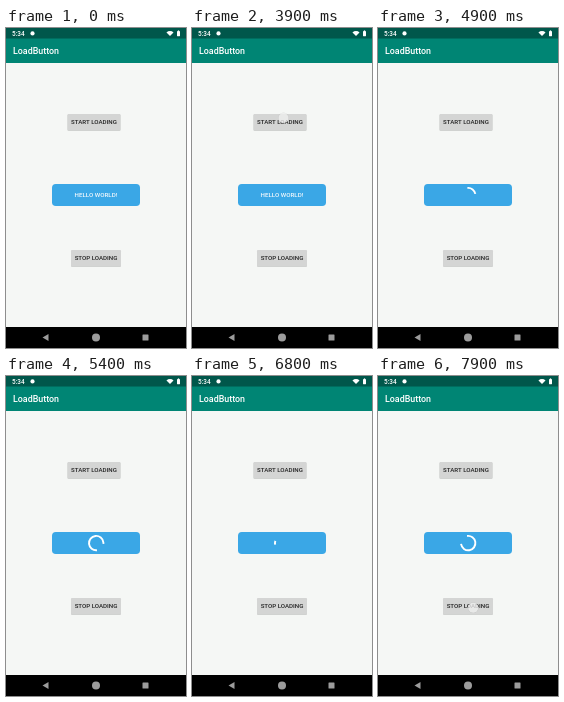
Animation, 180 px wide and 320 px high, one loop 8 s. Source, as an HTML page with a canvas:

```html
<!DOCTYPE html>
<html lang="en">
<head>
<meta charset="utf-8">
<title>Load button</title>
<style>
html, body { margin: 0; width: 100%; height: 100%; overflow: hidden; background: #f5f7f5; }
canvas { display: block; width: 180px; height: 320px; }
</style>
</head>
<body>
<canvas id="stage"></canvas>
<script>
const W = 180, H = 320, LOOP = 8000, STEP = 100;
const SPIN_START = 4000, SWEEP_START = 3800, SWEEP_TIME = 1000;
const MIN_ARC = 30, MAX_SWEEP = 300;
const canvas = document.getElementById('stage');
const ctx = canvas.getContext('2d');
const ratio = window.devicePixelRatio || 1;
canvas.width = W * ratio;
canvas.height = H * ratio;
ctx.scale(ratio, ratio);

function rect(x, y, w, h, color, r = 0) {
  ctx.fillStyle = color;
  ctx.beginPath();
  ctx.roundRect(x, y, w, h, r);
  ctx.fill();
}

function disc(x, y, r, color) {
  ctx.fillStyle = color;
  ctx.beginPath();
  ctx.arc(x, y, r, 0, Math.PI * 2);
  ctx.fill();
}

function poly(points, color) {
  ctx.fillStyle = color;
  ctx.beginPath();
  points.forEach(([x, y]) => ctx.lineTo(x, y));
  ctx.fill();
}

function label(text, x, y, size, color, align = 'center') {
  ctx.font = `500 ${size}px Roboto, sans-serif`;
  ctx.textAlign = align;
  ctx.fillStyle = color;
  ctx.fillText(text, x, y);
}

function topBars() {
  rect(0, 0, W, 35, '#008574');
  rect(0, 0, W, 10.5, '#00574b');
  label('5:34', 6, 7.8, 6.4, '#fff', 'left');
  disc(26.5, 5.4, 2.1, '#fff');
  ctx.fillStyle = '#fff';
  ctx.beginPath();
  ctx.moveTo(164, 8);
  ctx.arc(164, 8, 5, -Math.PI * 0.75, -Math.PI * 0.25);
  ctx.fill();
  rect(171, 3, 3, 5.2, '#fff', 0.4);
  rect(171.9, 2.4, 1.2, 1, '#fff');
  label('LoadButton', 7, 26.2, 8.9, '#fff', 'left');
}

function navBar() {
  const gray = '#9c9c9c';
  rect(0, 299, W, 21, '#000');
  poly([[36.5, 309.5], [42.5, 306], [42.5, 313]], gray);
  disc(90, 309.5, 4, gray);
  rect(136.5, 306.5, 6, 6, gray, 0.5);
}

function grayButton(text, x, y, w, color = '#d4d5d4') {
  rect(x, y + 0.5, w, 16.5, 'rgba(0,0,0,.16)', 1);
  rect(x, y, w, 16.4, color, 1);
  label(text, x + w / 2, y + 10.4, 6.15, '#222');
}

// The arc turns once a second while it shrinks and grows in turn.
function spinner(t) {
  const phase = (t - SWEEP_START) / SWEEP_TIME;
  const round = Math.floor(phase);
  const growing = round % 2 === 1;
  const left = 1 - phase % 1;
  const sweep = MAX_SWEEP * (1 - left * left);
  const offset = Math.ceil(round / 2) * 2 * MIN_ARC;
  const base = (t - SPIN_START) * 0.36 - offset;
  const from = growing ? base : base + sweep;
  const to = base + MIN_ARC + (growing ? sweep : MAX_SWEEP);
  const rad = Math.PI / 180;
  ctx.strokeStyle = '#fff';
  ctx.lineWidth = 1.9;
  ctx.beginPath();
  ctx.arc(90.2, 167.1, 7.2, from * rad, to * rad);
  ctx.stroke();
}

function touch(x, y) {
  disc(x, y, 5.4, 'rgba(150,150,150,.2)');
  disc(x, y, 5, 'rgba(245,245,245,.72)');
}

function draw(t) {
  const pressed = t >= 4000 && t < 4200;
  rect(0, 0, W, H, '#f5f7f5');
  topBars();
  grayButton('START LOADING', 61.5, 86, 53, pressed ? '#cbcccb' : undefined);
  grayButton('STOP LOADING', 65, 222, 50);
  rect(46, 156, 88, 22, '#3aa7e6', 3.8);
  if (t <= SPIN_START) label('HELLO WORLD!', 90, 169.3, 6.2, '#f2f8fc');
  else spinner(t);
  navBar();
  if (t >= 3900 && t < 4100) touch(91.5, 90);
  if (t >= 7900) touch(95.2, 231.7);
}

const begin = performance.now();
function tick() {
  const t = (performance.now() - begin) % LOOP;
  draw(Math.floor(t / STEP) * STEP);
  requestAnimationFrame(tick);
}
tick();
</script>
</body>
</html>
```
